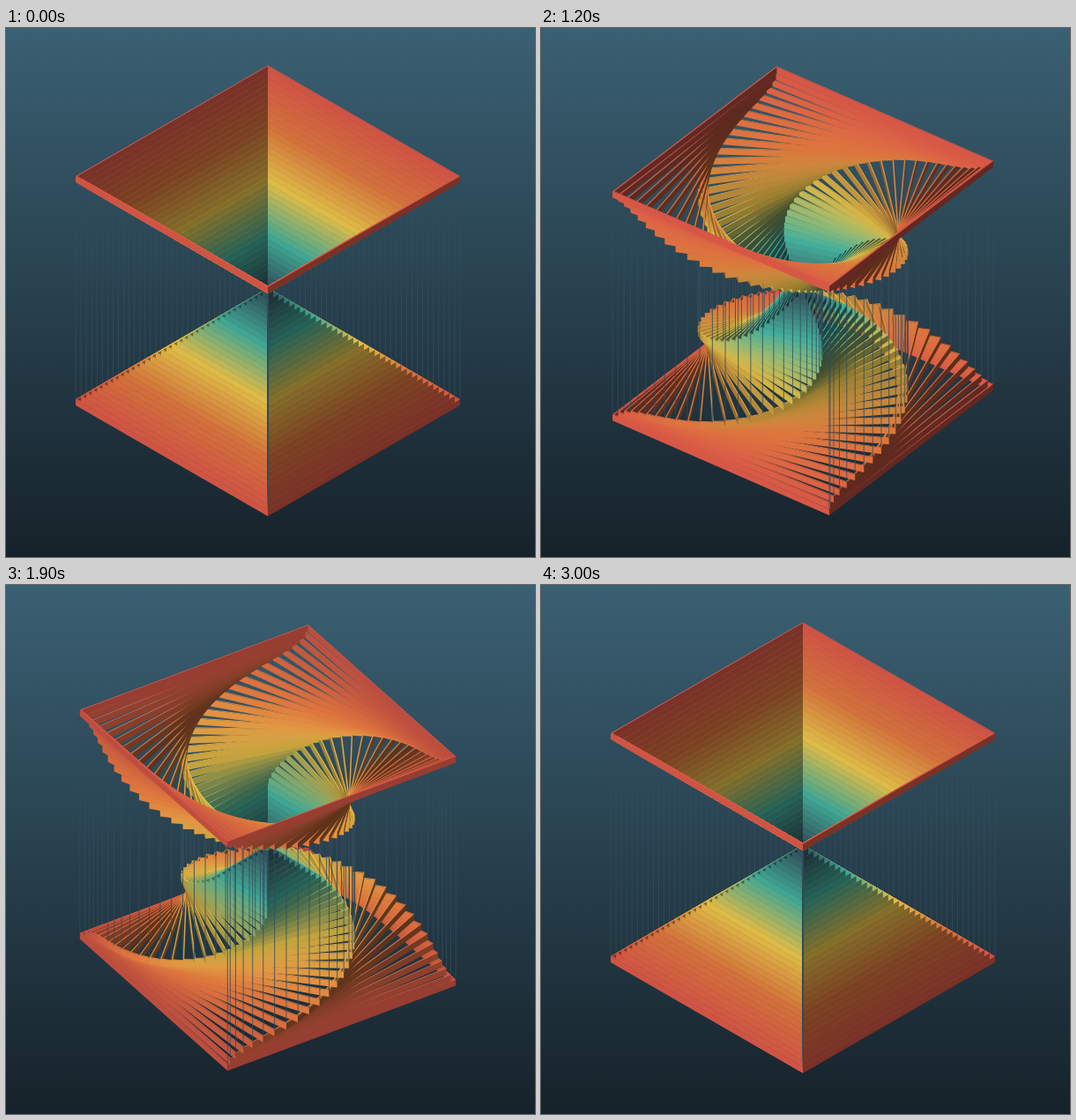
Recreate the animation shown at these times as an HTML page with a canvas. Size 600x600 px, loop 3100 ms.

```html
<!DOCTYPE html>
<html lang="en">
<head>
<meta charset="utf-8">
<title>Twisting pyramids</title>
<style>
  html, body { margin: 0; width: 100%; height: 100%; overflow: hidden; background: #16222a; }
  canvas { display: block; width: 600px; height: 600px; }
</style>
</head>
<body>
<canvas id="stage" width="600" height="600"></canvas>
<script>
const ctx = document.getElementById('stage').getContext('2d');
const LOOP = 3100, STEP = 100, TURN = 1800, LAG = 1121;
const RINGS = 36, RADIUS = 218, RISE = 126, WALL = 7, THICK = 2.1;
const CX = 297, TOP_Y = 294, BASE_Y = 295, TILT = 1 / Math.sqrt(3);
const PALETTE = [[51, 77, 92], [69, 178, 157], [239, 201, 76], [226, 122, 63], [223, 90, 73]];

const clamp = (v, lo, hi) => Math.min(hi, Math.max(lo, v));
const smooth = u => u * u * (3 - 2 * u);

const sky = ctx.createLinearGradient(0, 0, 0, 600);
sky.addColorStop(0, '#3a6073');
sky.addColorStop(1, '#16222a');

function colorAt(r, light) {
  const p = r * (PALETTE.length - 1);
  const i = Math.min(Math.floor(p), PALETTE.length - 2);
  const mix = PALETTE[i].map((c, k) => Math.round((c + (PALETTE[i + 1][k] - c) * (p - i)) * light));
  return `rgb(${mix})`;
}

// Light comes from the front, a little to the left.
const lightOn = a => clamp(0.25 + 0.74 * Math.cos(a + 0.38), 0.42, 0.98);

// The wider the ring, the later it makes its half turn.
const angleAt = (r, t) =>
  Math.PI * clamp((t - LAG * smooth(Math.pow(r, 1.4))) / TURN, 0, 1);

const corner = (radius, a, y) => [CX + radius * Math.sin(a), y + radius * Math.cos(a) * TILT];
const square = (radius, a, y) => [0, 1, 2, 3].map(k => corner(radius, a + k * Math.PI / 2, y));

function trace(points) {
  points.forEach(([x, y], i) => i ? ctx.lineTo(x, y) : ctx.moveTo(x, y));
  ctx.closePath();
}

function drawRing(r, angle, y) {
  const outer = square(RADIUS * r, angle, y);
  const inner = square(Math.max(0, RADIUS * r - THICK), angle, y);
  for (const front of [false, true]) {
    const side = front ? outer : inner;
    for (let k = 0; k < 4; k++) {
      const normal = angle + Math.PI / 4 + k * Math.PI / 2;
      if (Math.cos(normal) > 0 !== front) continue;
      const [ax, ay] = side[k], [bx, by] = side[(k + 1) % 4];
      ctx.fillStyle = colorAt(r, lightOn(front ? normal : normal + Math.PI));
      ctx.beginPath();
      trace([[ax, ay], [bx, by], [bx, by + WALL], [ax, ay + WALL]]);
      ctx.fill();
    }
  }
  ctx.fillStyle = colorAt(r, 0.96);
  ctx.beginPath();
  trace(outer);
  trace(inner);
  ctx.fill('evenodd');
}

function drawStrings(rings, front) {
  ctx.strokeStyle = 'rgba(51, 77, 92, 0.8)';
  ctx.lineWidth = 1;
  ctx.beginPath();
  for (const { r, angle } of rings) {
    for (let k = 0; k < 4; k++) {
      const a = angle + k * Math.PI / 2;
      if (Math.cos(a) > 1e-6 !== front) continue;
      const [x, top] = corner(RADIUS * r, a, TOP_Y - RISE * r + WALL);
      const [, bottom] = corner(RADIUS * r, a, BASE_Y + RISE * r);
      ctx.moveTo(x, top);
      ctx.lineTo(x, bottom);
    }
  }
  ctx.stroke();
}

function draw(t) {
  const rings = Array.from({ length: RINGS }, (_, i) => {
    const r = (i + 1) / RINGS;
    return { r, angle: angleAt(r, t) };
  });
  ctx.fillStyle = sky;
  ctx.fillRect(0, 0, 600, 600);
  drawStrings(rings, false);
  for (const { r, angle } of [...rings].reverse()) drawRing(r, angle, BASE_Y + RISE * r);
  drawStrings(rings, true);
  for (const { r, angle } of rings) drawRing(r, angle, TOP_Y - RISE * r);
}

function tick(now) {
  draw(Math.floor(now % LOOP / STEP) * STEP);
  requestAnimationFrame(tick);
}
draw(0);
requestAnimationFrame(tick);
</script>
</body>
</html>
```
